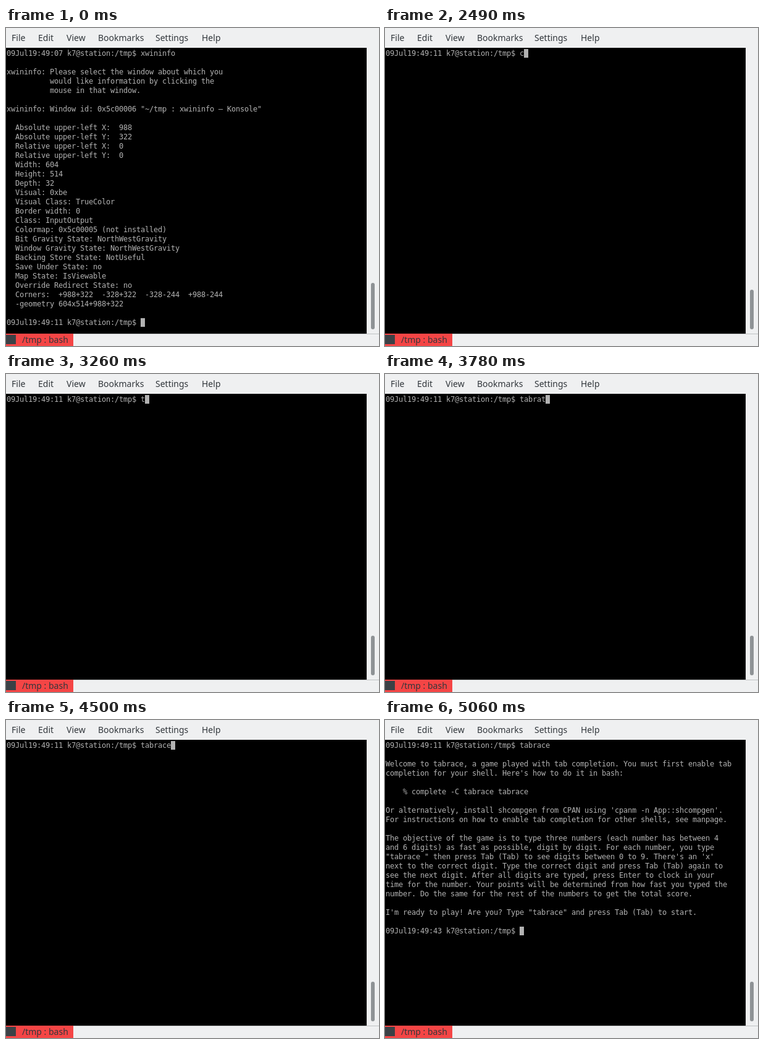
Animation, 604 px wide and 514 px high, one loop 8 s. Source, as an HTML page:

```html
<!DOCTYPE html>
<html lang="en">
<head>
<meta charset="utf-8">
<title>Terminal session</title>
<style>
  html, body { margin: 0; width: 100%; height: 100%; overflow: hidden; background: #eff0f1; }
  body { position: relative; font: 14px/19px "Noto Sans", sans-serif; color: #31363b; }
  body div, .menu span { position: absolute; white-space: pre; }
  .menu span { top: 6px; }
  #term { left: 0; top: 32px; width: 584px; height: 462px; background: #000; overflow: hidden; }
  #term div { color: #b2b2b2; }
  #rows { left: 1px; top: 2px; }
  /* every character sits in a 7px by 15px cell */
  #rows p {
    margin: 0; height: 15px;
    font: 12px/14px "DejaVu Sans Mono", monospace;
    letter-spacing: calc(7px - 1ch);
  }
  #cursor { width: 7px; height: 14px; background: #b2b2b2; }
  #thumb { left: 591px; width: 6px; bottom: 0; border-radius: 3px; background: #8e9295; }
  .track { left: 0; top: 0; width: 604px; height: 487px; }
  .bar { left: 0; top: 494px; width: 604px; height: 1px; background: #bfc1c2; }
  .tab { left: 0; top: 494px; width: 109px; height: 20px; background: #f54545; }
  .icon { left: 0; top: 2px; width: 16px; height: 15px; background: #3b4146; }
  .label { left: 26px; top: 0; }
</style>
</head>
<body>
<div class="menu">
  <span style="left:9px">File</span>
  <span style="left:52px">Edit</span>
  <span style="left:98px">View</span>
  <span style="left:149px">Bookmarks</span>
  <span style="left:242px">Settings</span>
  <span style="left:317px">Help</span>
</div>
<div class="track"><div id="thumb"></div></div>
<div id="term"><div id="rows"></div><div id="cursor"></div></div>
<div class="bar"></div>
<div class="tab"><div class="icon"></div><div class="label">/tmp : bash</div></div>

<script>
const LOOP = 8000;
const prompt = (time, cmd = "") => `09Jul19:49:${time} k7@station:/tmp$ ${cmd}`;
const typed = cmd => prompt(11, cmd);

const windowInfo = `${prompt("07", "xwininfo")}

xwininfo: Please select the window about which you
          would like information by clicking the
          mouse in that window.

xwininfo: Window id: 0x5c00006 "~/tmp : xwininfo — Konsole"

  Absolute upper-left X:  988
  Absolute upper-left Y:  322
  Relative upper-left X:  0
  Relative upper-left Y:  0
  Width: 604
  Height: 514
  Depth: 32
  Visual: 0xbe
  Visual Class: TrueColor
  Border width: 0
  Class: InputOutput
  Colormap: 0x5c00005 (not installed)
  Bit Gravity State: NorthWestGravity
  Window Gravity State: NorthWestGravity
  Backing Store State: NotUseful
  Save Under State: no
  Map State: IsViewable
  Override Redirect State: no
  Corners:  +988+322  -328+322  -328-244  +988-244
  -geometry 604x514+988+322

${prompt(11)}`;

const welcome = `${typed("tabrace")}

Welcome to tabrace, a game played with tab completion. You must first enable tab
completion for your shell. Here's how to do it in bash:

    % complete -C tabrace tabrace

Or alternatively, install shcompgen from CPAN using 'cpanm -n App::shcompgen'.
For instructions on how to enable tab completion for other shells, see manpage.

The objective of the game is to type three numbers (each number has between 4
and 6 digits) as fast as possible, digit by digit. For each number, you type
"tabrace " then press Tab (Tab) to see digits between 0 to 9. There's an 'x'
next to the correct digit. Type the correct digit and press Tab (Tab) again to
see the next digit. After all digits are typed, press Enter to clock in your
time for the number. Your points will be determined from how fast you typed the
number. Do the same for the rest of the numbers to get the total score.

I'm ready to play! Are you? Type "tabrace" and press Tab (Tab) to start.

${prompt(43)}`;

// [start in ms, screen text]
const steps = [
  [0, windowInfo],
  [1040, typed("")],
  [2490, typed("c")],
  [2990, typed("")],
  [3260, typed("t")],
  [3420, typed("tab")],
  [3570, typed("tabr")],
  [3780, typed("tabrat")],
  [3980, typed("tabrate")],
  [4170, typed("tabrat")],
  [4400, typed("tabra")],
  [4500, typed("tabrace")],
  [4970, typed("tabrace") + "\n"],
  [5060, welcome],
];

const [rows, cursor, thumb] = ["rows", "cursor", "thumb"].map(id => document.getElementById(id));
let shown = -1;

function show(index) {
  if (index === shown) return;
  shown = index;
  const lines = steps[index][1].split("\n");
  rows.replaceChildren(...lines.map(line => {
    const p = document.createElement("p");
    p.textContent = line;
    return p;
  }));
  // the cursor follows the last character
  cursor.style.left = 1 + 7 * lines.at(-1).length + "px";
  cursor.style.top = 2 + 15 * (lines.length - 1) + "px";
  thumb.style.height = (index === 0 ? 75 : 64) + "px";
}

const start = performance.now();
function tick() {
  const t = (performance.now() - start) % LOOP;
  show(steps.findLastIndex(([from]) => t >= from));
  requestAnimationFrame(tick);
}
tick();
</script>
</body>
</html>
```
